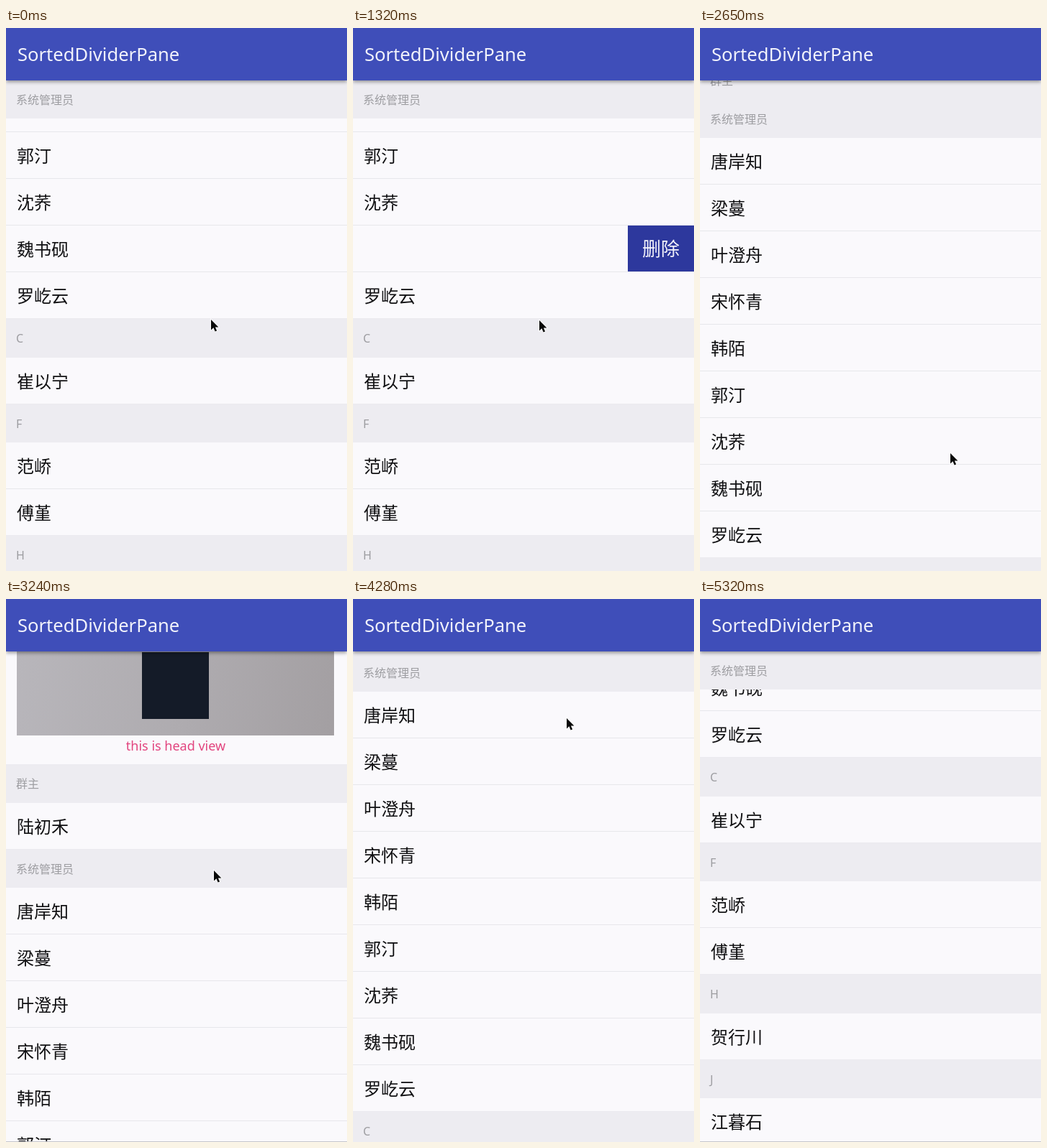
Animation of 474x756 px, one loop 5650 ms. Source, as an HTML page:

```html
<!DOCTYPE html>
<html lang="zh-CN">
<head>
<meta charset="utf-8">
<title>Sectioned list</title>
<style>
  html, body { margin: 0; width: 100%; height: 100%; overflow: hidden; background: #faf9fc; }
  body { font-family: "Noto Sans", "Noto Sans CJK SC", "Noto Sans CJK", sans-serif; }
  #stage { position: relative; width: 474px; height: 756px; overflow: hidden; }
  #stage::after {
    content: ""; position: absolute; left: 0; right: 0; bottom: 0;
    height: 1px; background: #c6c6cb;
  }
  .bar {
    position: absolute; z-index: 2; top: 0; left: 0; width: 100%; height: 73px;
    box-sizing: border-box; padding-left: 16px;
    background: #3f4eb9; color: #f1f2fb; font-size: 25.6px; line-height: 73px;
    box-shadow: 0 2px 5px rgba(0, 0, 0, .4);
  }
  #list { position: absolute; top: 72px; left: 0; width: 100%; height: 684px; overflow: hidden; }
  .head { position: relative; height: 195px; }
  .photo {
    position: absolute; left: 15px; top: 15px; width: 441px; height: 140px;
    background: linear-gradient(100deg, #b8b6bb, #aeabaf 55%, #a39fa2);
  }
  .photo i {
    position: absolute; left: 174px; top: 24px; width: 93px; height: 93px; background: #141b28;
  }
  .head p {
    position: absolute; left: 0; top: 155px; width: 472px; margin: 0;
    text-align: center; font-size: 18px; line-height: 28px; color: #e2457f;
  }
  .label {
    position: sticky; z-index: 1; top: 0; height: 53.5px; padding-left: 14px;
    background: #edecf1; color: #9d9da1; font-size: 16px; line-height: 55px;
  }
  .row { height: 64px; overflow: hidden; border-bottom: 1px solid #e7e7eb; }
  .row:last-child { border-color: #ebeaef; }
  .cell {
    position: relative; height: 64px; padding-left: 15px;
    color: #101012; font-size: 24px; line-height: 65px;
  }
  .cell b {
    position: absolute; left: 100%; top: 0; width: 92px; height: 64px;
    background: #2d389d; color: #f4f4fb; font-weight: 400; font-size: 26px; text-align: center;
  }
  #cursor { position: absolute; z-index: 3; left: 0; top: 0; overflow: visible; }
</style>
</head>
<body>
<div id="stage">
  <div class="bar">SortedDividerPane</div>
  <div id="list">
    <div class="head">
      <div class="photo"><i></i></div>
      <p>this is head view</p>
    </div>
  </div>
  <svg id="cursor" width="12" height="18">
    <path d="M0 0V14.4L3.4 11.3 5.6 16.5 8.1 15.4 5.9 10.4H10.4Z" fill="#080808" stroke="#fff" stroke-width="1.6" paint-order="stroke"/>
  </svg>
</div>
<script>
  const LOOP = 5650, STEP = 147.78, LAST = 36;
  const FIRST_SCROLL = 619, BUTTON = 92;

  const sections = {
    "群主": "陆初禾",
    "系统管理员": "唐岸知 梁蔓 叶澄舟 宋怀青 韩陌 郭汀 沈荞 魏书砚 罗屹云",
    "C": "崔以宁",
    "F": "范峤 傅堇",
    "H": "贺行川",
    "J": "江暮石"
  };

  // Pointer stops: step, x, y
  const stops = [
    [0, 285, 406], [2, 345, 308], [6, 240, 308], [9, 259, 407], [11, 340, 302], [14, 345, 427],
    [18, 348, 592], [20, 300, 130], [22, 289, 378], [25, 292, 475], [29, 297, 166], [36, 500, 340]
  ];

  const list = document.getElementById("list");
  const cursor = document.getElementById("cursor");

  function add(parent, className, text = "") {
    const el = document.createElement("div");
    el.className = className;
    el.textContent = text;
    return parent.appendChild(el);
  }

  for (const [label, names] of Object.entries(sections)) {
    const section = add(list, "section");
    add(section, "label", label);
    for (const name of names.split(" ")) add(add(section, "row"), "cell", name);
  }

  const swiped = list.querySelectorAll(".cell")[8];
  swiped.appendChild(document.createElement("b")).textContent = "删除";

  const progress = (step, from, to) => Math.min(1, Math.max(0, (step - from) / (to - from)));
  const drag = (...span) => (1 - Math.cos(Math.PI * progress(...span))) / 2;
  const fling = (...span) => 1 - (1 - progress(...span)) ** 3;

  // Down to the head view and back up again
  const scrollAt = step => FIRST_SCROLL
    - 333 * drag(step, 11, 18.08)
    - 285 * fling(step, 20, 24)
    + 309 * drag(step, 25, 29)
    + 493 * drag(step, 29, 36);

  const swipeAt = step => BUTTON * (drag(step, 2, 6) - drag(step, 9, 11));

  function pointerAt(step) {
    const i = Math.max(1, stops.findIndex(stop => stop[0] >= step));
    const [from, x0, y0] = stops[i - 1], [to, x1, y1] = stops[i];
    const k = progress(step, from, to);
    return [x0 + (x1 - x0) * k, y0 + (y1 - y0) * k];
  }

  function draw(now) {
    const step = Math.min(LAST, Math.floor((now % LOOP + 12) / STEP));
    const [x, y] = pointerAt(step);
    list.scrollTop = Math.round(scrollAt(step));
    swiped.style.transform = `translateX(${-swipeAt(step)}px)`;
    cursor.style.transform = `translate(${x}px, ${y}px)`;
  }

  const start = performance.now();
  function tick() {
    draw(performance.now() - start);
    requestAnimationFrame(tick);
  }
  tick();
</script>
</body>
</html>
```
